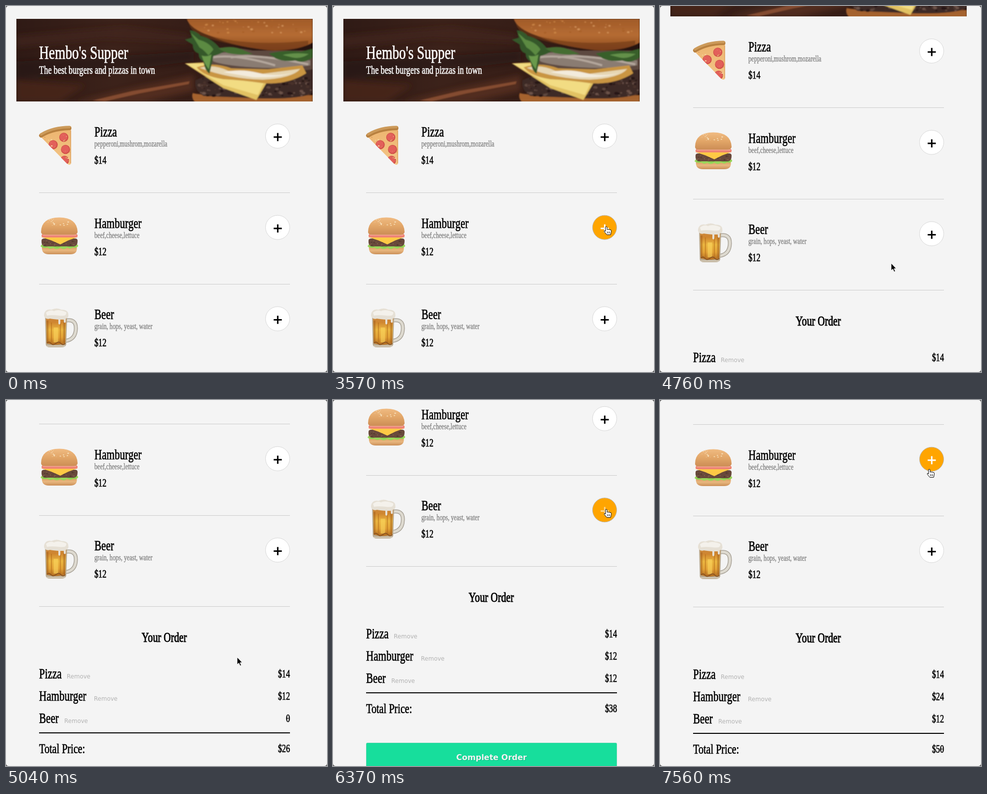
These frames come from a looping animation (650 by 740 pixels, 8 s). An HTML page:

```html
<!DOCTYPE html>
<html lang="en">
<head>
<meta charset="utf-8">
<title>Food menu</title>
<style>
  html, body { margin: 0; width: 100%; height: 100%; overflow: hidden; background: #555; }
  svg { display: block; width: 100vw; height: 100vh; }
  .deco { font-family: "Liberation Serif", "Times New Roman", serif; fill: #000; stroke: #000; stroke-width: .7px; }
  .deco.soft { fill: #808080; stroke: #808080; stroke-width: .35px; }
  .deco.light { fill: #fff; stroke: #fff; }
  .deco.bold { stroke-width: 1px; }
  .sans { font-family: "DejaVu Sans", Verdana, sans-serif; }
</style>
</head>
<body>
<svg id="stage" viewBox="0 0 650 740" xmlns="http://www.w3.org/2000/svg"></svg>
<script>
const LOOP = 8000, STEP = 70, ROW = 184.7;
const CONDENSE = 0.72; // one narrow face for all display text

const menu = [
  { name: 'Pizza', about: 'pepperoni,mushrom,mozarella', price: '$14', removeX: 123 },
  { name: 'Hamburger', about: 'beef,cheese,lettuce', price: '$12', removeX: 178 },
  { name: 'Beer', about: 'grain, hops, yeast, water', price: '$12', removeX: 118 }
];

// [time, value...] keys
const scrollKeys = [
  [4060, 0], [4130, 9], [4200, 24], [4270, 43], [4340, 68], [4410, 92], [4480, 112],
  [4550, 112], [4620, 126], [4690, 147], [4760, 172], [4900, 247], [5040, 329],
  [5110, 362], [5180, 384], [5390, 384], [5460, 396], [5530, 410],
  [6650, 410], [6790, 396], [7000, 344], [7140, 328]
];
const cursorKeys = [
  [70, 470, 632], [140, 484, 555], [210, 499, 472], [280, 505, 421], [560, 505, 421],
  [630, 508, 394], [700, 513, 377], [1330, 513, 377], [1540, 575, 350], [1680, 590, 312],
  [1820, 570, 280], [1960, 553, 269], [2590, 553, 269], [2870, 563, 287], [2940, 563, 287],
  [3150, 572, 345], [3360, 560, 459], [3570, 553, 446], [4550, 553, 446], [4690, 468, 520],
  [5600, 468, 520], [5740, 478, 484], [6020, 540, 290], [6160, 552, 226], [6230, 553, 221],
  [6930, 553, 221], [7140, 560, 205], [7420, 545, 140]
];
// [from, to, row]
const hovers = [[1820, 3010, 0], [3290, 4620, 1], [6090, 6860, 2], [7350, LOOP, 1]];
const presses = [[6300, 6720], [7420, 7560]];

const inside = (t, [from, to]) => t >= from && t < to;

function valueAt(keys, t) {
  if (t <= keys[0][0]) return keys[0].slice(1);
  for (let i = 1; i < keys.length; i++) {
    const a = keys[i - 1], b = keys[i];
    if (t < b[0]) {
      const k = (t - a[0]) / (b[0] - a[0]);
      return a.slice(1).map((v, j) => v + (b[j + 1] - v) * k);
    }
  }
  return keys[keys.length - 1].slice(1);
}

function random(seed) {
  return () => (seed = (seed * 16807) % 2147483647) / 2147483647;
}

const deco = (x, y, size, str, cls = '', extra = '') =>
  `<text class="deco ${cls}" font-size="${size}" transform="translate(${x} ${y}) scale(${CONDENSE} 1)" ${extra}>${str}</text>`;

const line = (y, color, width) =>
  `<path d="M67 ${y}H575" stroke="${color}" stroke-width="${width}"/>`;

const shape = (d, fill, extra = '') => `<path d="${d}" fill="${fill}" ${extra}/>`;

function gradient(id, stops, vertical = true) {
  const marks = stops.map((c, i) => `<stop offset="${i / (stops.length - 1)}" stop-color="${c}"/>`).join('');
  return `<linearGradient id="${id}" x2="${vertical ? 0 : 1}" y2="${vertical ? 1 : 0}">${marks}</linearGradient>`;
}

function specks(count, seed, [x, y, w, h], colors, size) {
  const rnd = random(seed);
  let out = '';
  for (let i = 0; i < count; i++) {
    const cx = x + rnd() * w, cy = y + rnd() * h, r = size * (0.4 + rnd());
    out += `<ellipse cx="${cx.toFixed(1)}" cy="${cy.toFixed(1)}" rx="${(r * 1.5).toFixed(1)}" ry="${r.toFixed(1)}" fill="${colors[i % colors.length]}"/>`;
  }
  return out;
}

function banner() {
  const wood = `
    <rect x="21" y="26" width="600" height="167" fill="url(#wood)"/>
    <g filter="url(#haze)">
      ${shape('M21 60L240 42L370 58V74L200 66L21 84Z', '#44261d', 'opacity=".6"')}
      ${shape('M21 112L380 92V112L180 136L21 146Z', '#21110e', 'opacity=".5"')}
      ${shape('M21 150L160 160L110 193H21Z', '#4c291c', 'opacity=".8"')}
      ${shape('M140 193L270 163L380 140V172L280 193Z', '#5b3020', 'opacity=".75"')}
    </g>
    <g filter="url(#soft)">
      ${shape('M175 191L255 172L372 152L370 158L270 177L200 193Z', '#a05f3a', 'opacity=".65"')}
    </g>`;
  const burger = `
    <g filter="url(#soft)">
      ${shape('M378 176Q420 186 621 180V196H384Q374 186 378 176Z', '#a4622f')}
      ${shape('M384 150Q400 140 440 144L621 126V176Q600 188 520 187L400 182Q380 170 384 150Z', '#3c2925')}
      ${specks(110, 41, [392, 146, 226, 36], ['#604840', '#281916', '#6d534a', '#48302a'], 2)}
      ${shape('M362 116L400 114L532 148L507 190L440 166Z', '#e2c263')}
      ${shape('M364 116L400 117L526 147L510 180L440 160Z', '#f2dc83')}
      ${shape('M394 90Q440 78 500 90H621V128Q560 136 500 132T400 116Z', '#5d4a40')}
      ${shape('M412 98Q460 88 520 104L616 110V120Q560 128 500 124T420 112Z', '#8a7b72')}
      <path d="M416 104Q465 96 545 120M455 104Q510 96 612 118" fill="none" stroke="#b5a89d" stroke-width="4"/>
      ${shape('M386 124Q420 112 456 126L530 128L600 120L608 136Q570 160 520 156Q480 150 440 148Q400 142 386 124Z', '#c99543')}
      ${shape('M392 125Q420 117 450 131L520 137L596 127Q580 146 520 149Q450 147 392 125Z', '#e6d6b3')}
      ${shape('M440 134Q475 126 510 135T580 135Q550 146 500 144Z', '#f3ebdc')}
      ${shape('M366 26H621V74Q600 88 545 90Q470 86 412 60Q372 46 366 26Z', 'url(#roast)')}
      ${shape('M370 34Q384 52 420 62Q500 82 612 70V78Q585 93 530 90Q430 76 392 58Q372 48 370 34Z', '#6f3716', 'opacity=".6"')}
      ${specks(40, 73, [402, 28, 205, 26], ['#c98345', '#a9612a', '#d3935a'], 1.4)}
      ${shape('M372 49Q386 50 394 60Q418 66 432 84L446 90Q432 98 420 101L412 137Q402 130 400 112Q390 108 390 96Q378 92 378 78L362 68L376 64Z', '#34582a')}
      ${shape('M374 54L390 68Q412 74 420 88L410 100Q400 88 392 84Z', '#5c8a43')}
      ${shape('M396 100Q406 104 416 98L411 128Q402 118 396 100Z', '#6b994c')}
      ${shape('M430 86Q460 78 482 90L500 97Q470 100 448 95Z', '#456d33')}
      ${shape('M532 96Q568 88 598 92L621 86V104Q602 118 586 110Q564 114 546 106Z', '#395f2c')}
      ${shape('M560 99Q586 93 613 97Q596 108 580 104Z', '#63904a')}
    </g>`;
  return `<g clip-path="url(#frame)">${wood}${burger}</g>` +
    deco(67, 107, 38, "Hembo's Supper", 'light') +
    deco(67, 137, 22.7, 'The best burgers and pizzas in town', 'light');
}

const pizzaIcon = () => {
  const dots = [[117, 265.5], [95.5, 280.5], [120.5, 290], [118.5, 312]];
  return `<g clip-path="url(#slice)">
      ${shape('M66 260L133 238V324H124Z', 'url(#cheese)')}
      ${dots.map(([x, y]) => `<circle cx="${x}" cy="${y}" r="9.2" fill="#cf4c46"/><circle cx="${x - .4}" cy="${y - .4}" r="7.8" fill="#e2605a"/>`).join('')}
      ${specks(26, 19, [76, 254, 56, 60], ['#f6d09a', '#dca061'], .9)}
    </g>
    <path d="M71 262Q95 247.500 128.500 247" fill="none" stroke="#b8803f" stroke-width="8" stroke-linecap="round"/>
    <path d="M71 259.5Q95 245 128.5 244.800" fill="none" stroke="#cc9a5a" stroke-width="5" stroke-linecap="round"/>
    <path d="M131 252V318" stroke="#d99a55" stroke-width="1.2"/>`;
};

const burgerIcon = () => `
  ${shape('M73 486H143Q146 502 130 502H87Q71 502 73 486Z', 'url(#bunLow)')}
  ${shape('M70 486Q72 480 80 481H138Q147 481 146 486Q141 491 136 488Q130 493 124 488.500Q117 494 110 489Q102 494 96 489Q88 493 84 488.500Q76 491 70 486Z', '#98d65a')}
  <path d="M74 486Q80 488 85 485.500T97 486T110 486T123 485.500T141 486" fill="none" stroke="#6fb43c" stroke-width="1"/>
  ${shape('M72 474Q72 470 78 470H140Q145 470 145 475Q145 486 137 486H80Q71 486 72 474Z', '#68493b')}
  ${specks(30, 29, [76, 475, 64, 9], ['#805c4a', '#523a2e'], 1)}
  ${shape('M71 467H145L126 474L110 482L92 474Z', '#fdc945')}
  <rect x="72" y="461" width="73" height="7" rx="3.5" fill="#ee8475"/>
  <rect x="75" y="462" width="67" height="2" rx="1" fill="#f6a899"/>
  ${shape('M71 457Q71 428 108 427.5Q144 428 145 457Q144 463 135 462.5H81Q71 463 71 457Z', 'url(#bunTop)')}
  ${specks(18, 57, [85, 431, 46, 13], ['#f6dcb4'], .9)}`;

const beerIcon = () => `
  <path d="M120 636Q142 632 141.500 652Q141 674 121 677" fill="none" stroke="#aaa499" stroke-width="8"/>
  <path d="M120 636Q142 632 141.500 652Q141 674 121 677" fill="none" stroke="#dedad0" stroke-width="5"/>
  ${shape('M79 624H124L122 684Q121 690 112 690H89Q81 690 80.500 684Z', '#b9a98f')}
  ${shape('M81 624H122L120 682Q101 688 82.500 682Z', 'url(#ale)')}
  <path d="M84 636V681M118 636V681" stroke="#9c5a1c" stroke-width="4" opacity=".45"/>
  <path d="M92 640V681M110 640V681" stroke="#b36a19" stroke-width="1.500" opacity=".7"/>
  <path d="M101 650V680" stroke="#ffdc62" stroke-width="9" opacity=".55"/>
  <path d="M83 682Q87 677 91 682T101 682T111 682T120 682" fill="none" stroke="#8c5420" stroke-width="2"/>
  <path d="M82 687.500H120" stroke="#d8cfc0" stroke-width="2"/>
  ${shape('M80 631Q75 627 78 620Q82 612 92 614Q103 609 112 614Q125 614 126 622Q128 630 121 632V639Q119 642 117 639V634H110V642Q108 646 106 642V634Q94 633 89 632Q84 634 80 631Z', '#e6e0d5')}
  ${shape('M81 620Q90 613 97 617Q106 612 122 619Q124 628 108 626T83 626Z', '#f4f1eb')}`;

const icons = [pizzaIcon, burgerIcon, beerIcon];

const menuRow = (item, i) => {
  const y = i * ROW;
  return `${icons[i]()}
    ${deco(179, 264 + y, 29.3, item.name)}
    ${deco(179, 284 + y, 16.8, item.about, 'soft')}
    ${deco(179, 319 + y, 22.5, item.price)}
    ${line(Math.round(377 + y) + .5, '#ccc', 1)}
    <circle id="disc${i}" cx="550" cy="${263 + y}" r="24.5"/>
    <path id="plus${i}" d="M542 ${265 + y}h16.500m-8.250 -8.250v16.500" fill="none" stroke-width="3"/>`;
};

const amount = (id, y) => deco(575, y, 22.5, '', '', `id="${id}" text-anchor="end"`) +
  `<path id="${id}Bar" d="M567.500 ${y - 7.400}h5" stroke="#000" stroke-width="1.200"/>`;

const orderRow = (item, i) => {
  const y = 892 + i * 45;
  return deco(67, y, 29.3, item.name) +
    `<text class="sans" x="${item.removeX}" y="${y - .5}" font-size="11.8" fill="#b3b3b3">Remove</text>` +
    amount('cost' + i, y - 2);
};

const order = () => `
  ${deco(320.5, 818, 28, 'Your Order', 'bold', 'text-anchor="middle"')}
  ${menu.map(orderRow).join('')}
  ${line(1002, '#000', 2)}
  ${deco(67, 1043, 28, 'Total Price:')}
  ${amount('total', 1041)}
  <rect x="67.500" y="1103.500" width="507" height="58" rx="2" fill="#17de9c" stroke="#4fd3a8"/>
  <g class="sans" font-size="16" font-weight="bold" text-anchor="middle">
    <text x="322" y="1139" fill="#0a9a6a" opacity=".5">Complete Order</text>
    <text x="321" y="1138" fill="#f4f4f4">Complete Order</text>
  </g>`;

const cursor = () => `<g id="cursor">
  <path id="arrow" d="M0 0V15L3.500 11.800L6 17.500L8.500 16.400L6 11H10.500Z" fill="#000" stroke="#fff" stroke-width="1"/>
  <g id="hand" stroke="#000" stroke-linejoin="round">
    <path d="M-1.500 2Q-1.500 0 .2 0T2 2V6Q4 4.800 5 6Q7 5.300 8 6.500Q10.500 6 10.500 8.500V11.500L9 16.500H1.500L-3.500 10.500Q-4.500 8.500 -3 8L-1 9.500Z" fill="#fff"/>
    <path d="M2.500 10v4M5 10v4M7.500 10v4" stroke-width=".8"/>
  </g>
</g>`;

document.getElementById('stage').innerHTML = `
  <defs>
    ${gradient('wood', ['#2f1a15', '#3c221a', '#341c16', '#251310'], false)}
    ${gradient('roast', ['#a05a28', '#b56c33', '#8c4a1e'])}
    ${gradient('cheese', ['#ecb36d', '#f4c688'])}
    ${gradient('bunTop', ['#f0bb82', '#e2a668', '#cc8d55'])}
    ${gradient('bunLow', ['#d79a5c', '#e9b77f', '#cb9058'])}
    ${gradient('ale', ['#c98a45', '#cf8530', '#eab540', '#e2a136', '#b06a20'])}
    <filter id="haze"><feGaussianBlur stdDeviation="6"/></filter>
    <filter id="soft"><feGaussianBlur stdDeviation="1"/></filter>
    <clipPath id="frame"><rect x="21" y="26" width="600" height="167"/></clipPath>
    <clipPath id="slice"><path d="M68 262Q94 243 131.500 243V319Q129 323 124 319Z"/></clipPath>
  </defs>
  <rect width="650" height="740" rx="5" fill="#f4f4f4"/>
  <g id="page">${banner()}${menu.map(menuRow).join('')}${order()}</g>
  ${cursor()}`;

const el = id => document.getElementById(id);
const set = (id, attrs) => Object.entries(attrs).forEach(([k, v]) => el(id).setAttribute(k, v));

function setAmount(id, str) {
  if (el(id).textContent !== str) el(id).textContent = str;
  set(id + 'Bar', { visibility: str.endsWith('0') ? 'visible' : 'hidden' });
}

function draw(time) {
  const t = Math.floor(time / STEP) * STEP;
  const [scroll] = valueAt(scrollKeys, t);
  const [x, y] = valueAt(cursorKeys, t);
  const hover = hovers.find(h => inside(t, h));
  const pressed = presses.some(p => inside(t, p));

  set('page', { transform: `translate(0 ${-Math.round(scroll)})` });
  menu.forEach((item, i) => {
    const on = Boolean(hover) && hover[2] === i;
    set('disc' + i, { fill: on ? '#ffa500' : '#fff', stroke: on ? '#bbb' : '#d8d8d8' });
    set('plus' + i, { stroke: on ? '#fff' : '#000', 'stroke-opacity': on && pressed ? .55 : 1 });
  });

  const beer = t >= 6300, second = t >= 7560;
  setAmount('cost0', '$14');
  setAmount('cost1', second ? '$24' : '$12');
  setAmount('cost2', beer ? '$12' : '0');
  setAmount('total', second ? '$50' : beer ? '$38' : '$26');

  set('cursor', { transform: `translate(${x} ${y})`, visibility: t >= 70 ? 'visible' : 'hidden' });
  set('arrow', { display: hover ? 'none' : 'inline' });
  set('hand', { display: hover ? 'inline' : 'none' });
}

const start = performance.now();
function tick() {
  draw((performance.now() - start) % LOOP);
  requestAnimationFrame(tick);
}
tick();
</script>
</body>
</html>
```
